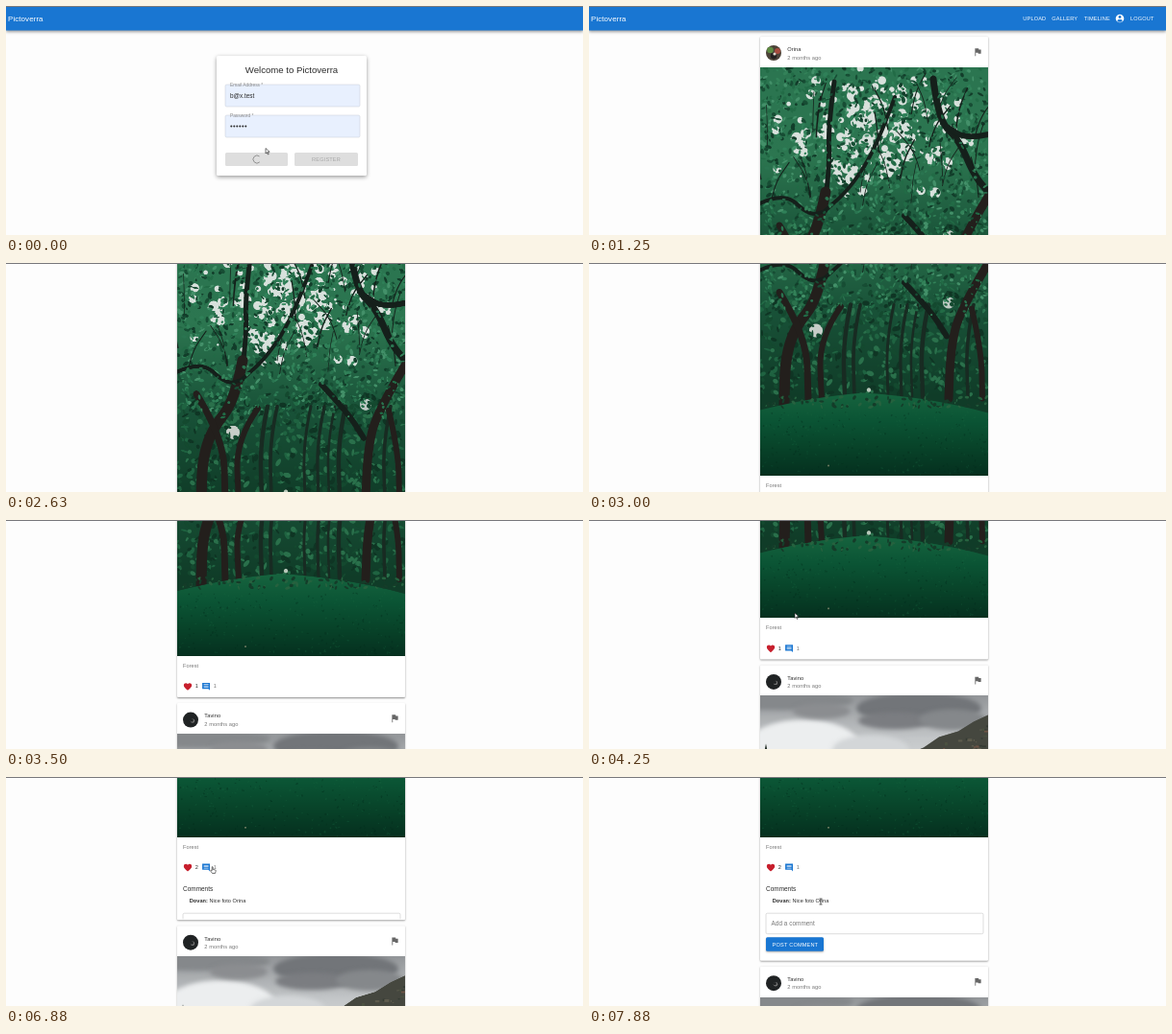
Recreate the animation shown at these times as an HTML page with a canvas. Size 600x239 px, loop 8000 ms.

```html
<!DOCTYPE html>
<html lang="en">
<head>
<meta charset="utf-8">
<title>Photo feed</title>
<style>
  html, body { margin: 0; width: 100%; height: 100%; overflow: hidden; background: #fff; }
  canvas { display: block; width: 600px; height: 239px; }
</style>
</head>
<body>
<canvas id="stage"></canvas>
<script>
const W = 600, H = 239, LOOP = 8000;
const BLUE = '#1976d2', INK = '#2b2b2b', GREY = '#777';
const LEFT = 178, PHOTO_W = 237, PHOTO_H = 356;
const APP = 'Pictoverra';

const canvas = document.getElementById('stage');
const dpr = window.devicePixelRatio || 1;
canvas.width = W * dpr;
canvas.height = H * dpr;
const ctx = canvas.getContext('2d');

const clamp = v => Math.max(0, Math.min(1, v));
const smooth = v => { v = clamp(v); return v * v * (3 - 2 * v); };

function random(seed) {
  return () => (seed = (seed * 16807) % 2147483647) / 2147483647;
}

function text(str, x, y, size, color = INK, { bold = false, spacing = 0, align = 'left' } = {}) {
  ctx.font = `${bold ? 'bold ' : ''}${size}px "Liberation Sans", Arial, sans-serif`;
  ctx.letterSpacing = spacing + 'px';
  ctx.textAlign = align;
  ctx.fillStyle = color;
  ctx.fillText(str, x, y);
}

const buttonText = (str, x, y, color = '#fff') => text(str, x, y, 5.6, color, { spacing: 0.16 });

function box(x, y, w, h, r, fill, stroke) {
  ctx.beginPath();
  ctx.roundRect(x, y, w, h, r);
  if (fill) { ctx.fillStyle = fill; ctx.fill(); }
  if (stroke) { ctx.strokeStyle = stroke; ctx.lineWidth = 0.5; ctx.stroke(); }
}

function shadowed(blur, offset, alpha, draw) {
  ctx.save();
  ctx.shadowColor = `rgba(0,0,0,${alpha})`;
  ctx.shadowBlur = blur * dpr;
  ctx.shadowOffsetY = offset * dpr;
  draw();
  ctx.restore();
}

function disc(x, y, r, fill, c = ctx) {
  c.fillStyle = fill;
  c.beginPath();
  c.arc(x, y, r, 0, Math.PI * 2);
  c.fill();
}

function icon(path, x, y, size, color) {
  ctx.save();
  ctx.translate(x, y);
  ctx.scale(size / 24, size / 24);
  ctx.fillStyle = color;
  ctx.fill(path);
  ctx.restore();
}

const ICONS = {
  heart: new Path2D('M12 21C5 15 2 12 2 8.300 2 2.500 9 1 12 5.200 15 1 22 2.500 22 8.300 22 12 19 15 12 21Z'),
  comment: new Path2D('M2 2H22V22L18 18H2Z'),
  flag: new Path2D('M5 3H14L14.500 6H20V16H13L12.500 14H7V22H5Z'),
  arrow: new Path2D('M0 0V17L4 13L7 20L10 19L7 12H13Z'),
  hand: new Path2D('M7 1Q9-1 10 2V9L18 11Q20 12 19 16L17 22H8L2 14Q2 11 5 12L7 13Z')
};

// ---- Photographs, painted once ----
function picture(w, h, paint) {
  const c = document.createElement('canvas');
  c.width = w * 2;
  c.height = h * 2;
  const g = c.getContext('2d');
  g.scale(2, 2);
  paint(g, w, h);
  return c;
}

function gradient(g, y0, y1, ...colors) {
  const fill = g.createLinearGradient(0, y0, 0, y1);
  colors.forEach((color, i) => fill.addColorStop(i / (colors.length - 1), color));
  return fill;
}

function limb(g, width, points, color = '#15201b') {
  g.strokeStyle = color;
  g.lineWidth = width;
  g.lineCap = 'round';
  g.beginPath();
  g.moveTo(...points[0]);
  for (let i = 1; i < points.length - 1; i++) {
    const [x, y] = points[i], [nx, ny] = points[i + 1];
    g.quadraticCurveTo(x, y, (x + nx) / 2, (y + ny) / 2);
  }
  g.lineTo(...points.at(-1));
  g.stroke();
}

const forest = picture(PHOTO_W, PHOTO_H, (g, w, h) => {
  const rnd = random(71);
  const leaves = (count, y0, y1, size, colors) => {
    for (let i = 0; i < count; i++) {
      g.fillStyle = colors[Math.floor(rnd() * colors.length)];
      g.beginPath();
      g.ellipse(rnd() * w, y0 + rnd() * (y1 - y0), size * (0.5 + rnd()), size * (0.3 + rnd() * 0.6), rnd() * 3, 0, 7);
      g.fill();
    }
  };
  g.fillStyle = gradient(g, 0, 275, '#2b7550', '#2c7650', '#195238', '#103c28');
  g.fillRect(0, 0, w, h);
  for (let i = 0; i < 230; i++) {
    const x = 118 + (rnd() + rnd() - 1) * 112, y = 65 + (rnd() + rnd() - 1) * 75;
    disc(x, y, 1 + rnd() * 5, '#d8e1dc', g);
  }
  disc(58, 205, 7, '#c7cdc8', g);
  disc(196, 176, 6, '#bfcac4', g);
  leaves(1300, 0, 185, 2.4, ['#226b46', '#2f8058', '#174d34', '#123d2a', '#439069']);
  leaves(650, 165, 272, 3, ['#14492f', '#1f6341', '#0f3524', '#2a704b']);

  for (const x of [88, 98, 133, 147, 158, 169, 216]) {
    limb(g, 2 + rnd() * 3, [[x + 6, 178], [x - 2, 215], [x, 274]], '#182b22');
  }
  limb(g, 5, [[77, 15], [71, 60], [72, 100], [68, 138]]);
  limb(g, 11, [[68, 130], [60, 172], [36, 202], [26, 235], [25, 282]], '#231f1c');
  limb(g, 4, [[140, 31], [122, 81], [94, 126], [66, 151]]);
  limb(g, 4, [[0, 142], [25, 130], [51, 155], [68, 150]]);
  limb(g, 7, [[180, 12], [185, 55], [207, 76], [222, 112], [237, 130]]);
  limb(g, 6, [[237, 70], [214, 75], [194, 62]]);
  limb(g, 9, [[237, 135], [207, 185], [198, 225], [196, 276]], '#231f1c');
  limb(g, 6, [[150, 155], [177, 184], [194, 211]]);
  limb(g, 6, [[84, 180], [61, 212], [64, 278]], '#231f1c');
  limb(g, 7, [[20, 165], [48, 210], [50, 278]], '#231f1c');
  limb(g, 6, [[220, 182], [230, 225], [231, 276]], '#231f1c');
  for (let i = 0; i < 26; i++) {
    const x = rnd() * w, y = 35 + rnd() * 130, lean = (rnd() - 0.5) * 50;
    limb(g, 0.6 + rnd(), [[x, y], [x + lean * 0.2, y - 20], [x + lean, y - 42]]);
  }
  leaves(420, 0, 190, 2, ['#226b46', '#338259', '#174d34', '#2a7450']);

  g.fillStyle = gradient(g, 270, h, '#17643f', '#0b5535', '#084329', '#05301f');
  g.beginPath();
  g.moveTo(0, 288);
  g.quadraticCurveTo(55, 274, 108, 270);
  g.quadraticCurveTo(180, 275, w, 291);
  g.lineTo(w, h);
  g.lineTo(0, h);
  g.fill();
  leaves(90, 274, 285, 2, ['#26623f', '#153c29']);
  g.globalAlpha = 0.35;
  leaves(320, 290, h, 1, ['#03291a', '#17633f']);
  g.globalAlpha = 1;
  disc(113, 267, 2.2, '#b8c8ba', g);
  disc(71, 346, 1, '#6d7b60', g);
});

const mountain = picture(PHOTO_W, 158, (g, w, h) => {
  const rnd = random(19);
  g.fillStyle = gradient(g, 0, 90, '#939699', '#c4c7c9', '#dfe1e2');
  g.fillRect(0, 0, w, h);
  const cloud = (x, y, rx, ry, color) => {
    g.save();
    g.filter = 'blur(5px)';
    g.fillStyle = color;
    g.beginPath();
    g.ellipse(x, y, rx, ry, 0, 0, 7);
    g.fill();
    g.restore();
  };
  cloud(45, 52, 58, 27, '#eceeef');
  cloud(115, 57, 40, 16, '#d3d6d8');
  cloud(22, 5, 75, 10, '#85888b');
  cloud(64, 16, 30, 8, '#8b8d90');
  cloud(165, 13, 65, 16, '#727579');
  cloud(140, 26, 38, 9, '#7b7d81');
  cloud(200, 25, 35, 11, '#85888b');

  const ridge = (color, points) => {
    g.fillStyle = color;
    g.beginPath();
    g.moveTo(0, h);
    points.forEach(p => g.lineTo(...p));
    g.lineTo(w, h);
    g.fill();
  };
  ridge('#a2a6a9', [[0, 86], [60, 81], [92, 72], [118, 82], [w, 75]]);
  ridge('#777c7c', [[0, 92], [78, 88], [108, 76], [130, 81], [w, 70]]);
  ridge('#45473f', [[90, 92], [137, 78], [151, 62], [170, 54], [186, 43], [206, 37], [222, 27], [w, 20]]);
  for (let i = 0; i < 170; i++) {
    const x = 130 + rnd() * 107;
    const y = 75 - (x - 130) * 0.43 + rnd() * 70;
    g.fillStyle = ['#343a33', '#5d5b4d', '#6c5446', '#4a5241'][Math.floor(rnd() * 4)];
    g.fillRect(x, y, 1 + rnd() * 4, 1 + rnd() * 2);
  }
  ridge('#30372e', [[0, 100], [65, 94], [110, 91], [165, 82], [w, 87]]);
  const pine = (x, top, base, half) => {
    g.fillStyle = '#202b25';
    for (let y = top; y < base; y += 3) {
      const spread = half * (0.15 + (y - top) / (base - top));
      g.beginPath();
      g.moveTo(x, y - 2);
      g.lineTo(x + spread, y + 4);
      g.lineTo(x - spread, y + 4);
      g.fill();
    }
  };
  pine(6, 52, 110, 8);
  pine(50, 60, 112, 11);
  pine(39, 74, 110, 6);
  pine(91, 78, 112, 8);
  pine(18, 79, 112, 8);
});

// ---- Page parts ----
function navbar(y, signedIn) {
  shadowed(3, 1, 0.4, () => { ctx.fillStyle = BLUE; ctx.fillRect(0, y, W, 25.5); });
  text(APP, 2, y + 16, 8, '#fff', { spacing: 0.06 });
  if (!signedIn) return;
  buttonText('UPLOAD', 451.3, y + 15);
  buttonText('GALLERY', 481.3, y + 15);
  buttonText('TIMELINE', 514.7, y + 15);
  buttonText('LOGOUT', 563, y + 15);
  disc(552, y + 13, 4.3, '#fff');
  disc(552, y + 11.5, 1.4, BLUE);
  ctx.beginPath();
  ctx.ellipse(552, y + 15.4, 2.6, 1.3, 0, 0, 7);
  ctx.fill();
}

function field(label, y) {
  box(228, y, 140, 23, 1.5, '#e8f0fe', '#c5cbd5');
  text(label, 233, y + 2.4, 4.8, '#888');
}

function login(t) {
  shadowed(4, 1.5, 0.4, () => box(219, 52, 156, 125, 1.5, '#fff'));
  text('Welcome to ' + APP, 297, 70, 9.6, INK, { align: 'center' });
  field('Email Address *', 82);
  text('b@x.test', 233, 96.3, 6.4);
  field('Password *', 114);
  for (let i = 0; i < 6; i++) disc(234.3 + i * 3, 125.4, 1, INK);
  box(228, 153, 65, 14, 1.5, '#dedede');
  box(300, 153, 66, 14, 1.5, '#dedede');
  text('REGISTER', 333, 162, 5.6, '#a6a6a6', { spacing: 0.16, align: 'center' });
  const turn = t / 1400 * Math.PI * 2;
  ctx.strokeStyle = '#8a8a8a';
  ctx.lineWidth = 0.9;
  ctx.beginPath();
  ctx.arc(261, 160, 4, turn + 0.8, turn + 5.4);
  ctx.stroke();
}

function postHeader(name, y) {
  text(name, 206.3, y - 16.6, 5.7, INK, { spacing: 0.06 });
  text('2 months ago', 206.3, y - 8.5, 5.7, GREY, { spacing: 0.06 });
  icon(ICONS.flag, 399.3, y - 21, 10, '#666');
}

function avatarOne(x, y) {
  disc(x, y, 8, '#4b4238');
  disc(x - 3.5, y - 3, 3.3, '#5e8b43');
  disc(x + 4, y - 2, 3, '#a54b3e');
  disc(x, y + 3, 3.2, '#221f1f');
  disc(x + 1, y + 1, 1.6, '#ded4c8');
}

function avatarTwo(x, y) {
  disc(x, y, 8, '#202324');
  disc(x + 2, y + 1, 2.2, '#777');
  disc(x + 1.3, y + 0.5, 1.6, '#202324');
}

function comments(bottom, height) {
  ctx.save();
  ctx.beginPath();
  ctx.rect(LEFT, bottom + 42, PHOTO_W, height);
  ctx.clip();
  text('Comments', 184, bottom + 56, 6.4, INK, { spacing: 0.05 });
  text('Dovan:', 190.7, bottom + 67.8, 5.6, INK, { bold: true, spacing: 0.04 });
  const nameWidth = ctx.measureText('Dovan: ').width;
  text('Nice foto Orina', 190.7 + nameWidth, bottom + 67.8, 5.6, INK, { spacing: 0.04 });
  box(184, bottom + 79.5, 226, 21.5, 1.5, null, '#bbb');
  text('Add a comment', 189.5, bottom + 92.2, 6.4, GREY, { spacing: 0.04 });
  shadowed(2, 1, 0.35, () => box(184, bottom + 104.5, 60, 14.5, 1.5, BLUE));
  buttonText('POST COMMENT', 190.6, bottom + 113.8);
  ctx.restore();
}

function feed(scroll, likes, open) {
  const top = 64 - scroll, bottom = top + PHOTO_H, extra = 86 * open;
  const cardEnd = bottom + 43 + extra;
  shadowed(2, 0.8, 0.45, () => box(LEFT, top - 32, PHOTO_W, cardEnd - top + 32, 1, '#fff'));
  avatarOne(192, top - 15);
  postHeader('Orina', top);
  ctx.drawImage(forest, LEFT, top, PHOTO_W, PHOTO_H);
  text('Forest', 184, bottom + 12, 5.6, GREY, { spacing: 0.05 });
  icon(ICONS.heart, 184, bottom + 27, 10, '#c71f2d');
  text(String(likes), 196.8, bottom + 33.3, 5.6);
  icon(ICONS.comment, 203.3, bottom + 27, 9.5, BLUE);
  ctx.fillStyle = '#fff';
  for (const dy of [29.3, 30.7, 32.1]) ctx.fillRect(205.6, bottom + dy, 5, 0.6);
  text('1', 215.8, bottom + 33.3, 5.6, GREY);
  if (extra) comments(bottom, extra);

  const next = bottom + 81 + extra;
  shadowed(2, 0.8, 0.35, () => box(LEFT, next - 32, PHOTO_W, 240, 1, '#fff'));
  avatarTwo(192, next - 14.5);
  postHeader('Tavino', next);
  ctx.drawImage(mountain, LEFT, next, PHOTO_W, 158);
}

// ---- Motion ----
const WHEEL_TIMES = [2330, 2450, 2570, 2690, 2810, 3130, 3300, 3500, 4400];
const scrollAt = t => WHEEL_TIMES.reduce((sum, start) => sum + 39.7 * smooth((t - start) / 160), 0);

const CURSOR_KEYS = [
  [3600, 214, 97], [4500, 214, 97], [5050, 188.5, 93], [5900, 188.5, 93],
  [6450, 212, 93.5], [7050, 212, 93.5], [7550, 300, 112], [7850, 241, 130]
];

function cursorAt(t) {
  const i = CURSOR_KEYS.findIndex(key => key[0] > t);
  if (i === 0) return CURSOR_KEYS[0].slice(1);
  if (i < 0) return CURSOR_KEYS.at(-1).slice(1);
  const [t0, x0, y0] = CURSOR_KEYS[i - 1], [t1, x1, y1] = CURSOR_KEYS[i];
  const p = smooth((t - t0) / (t1 - t0));
  return [x0 + (x1 - x0) * p, y0 + (y1 - y0) * p];
}

function pointer(shape, x, y) {
  ctx.save();
  ctx.translate(x, y);
  if (shape === 'beam') {
    ctx.strokeStyle = '#222';
    ctx.lineWidth = 0.7;
    ctx.stroke(new Path2D('M-1.500-3H1.500M0-3V3M-1.500 3H1.500'));
  } else {
    ctx.scale(0.32, 0.32);
    ctx.fillStyle = '#fff';
    ctx.strokeStyle = '#222';
    ctx.lineWidth = 2;
    ctx.fill(ICONS[shape]);
    ctx.stroke(ICONS[shape]);
  }
  ctx.restore();
}

function drawCursor(t) {
  if (t < 630) return pointer('arrow', 270, 148.5);
  if (t < 3600) return;
  const shape = t > 7780 ? 'beam' : t > 5000 && t < 7150 ? 'hand' : 'arrow';
  pointer(shape, ...cursorAt(t));
}

function render(t) {
  ctx.setTransform(dpr, 0, 0, dpr, 0, 0);
  ctx.fillStyle = '#fdfdfd';
  ctx.fillRect(0, 0, W, H);
  const scroll = scrollAt(t), signedIn = t >= 630;
  if (!signedIn) login(t);
  else if (t >= 1000) feed(scroll, t < 5500 ? 1 : 2, smooth((t - 6755) / 250));
  if (scroll < 30) navbar(-scroll, signedIn);
  ctx.fillStyle = '#77777b';
  ctx.fillRect(0, 0, W, 1);
  drawCursor(t);
}

function frame(now) {
  render(now % LOOP);
  requestAnimationFrame(frame);
}
requestAnimationFrame(frame);
</script>
</body>
</html>
```
